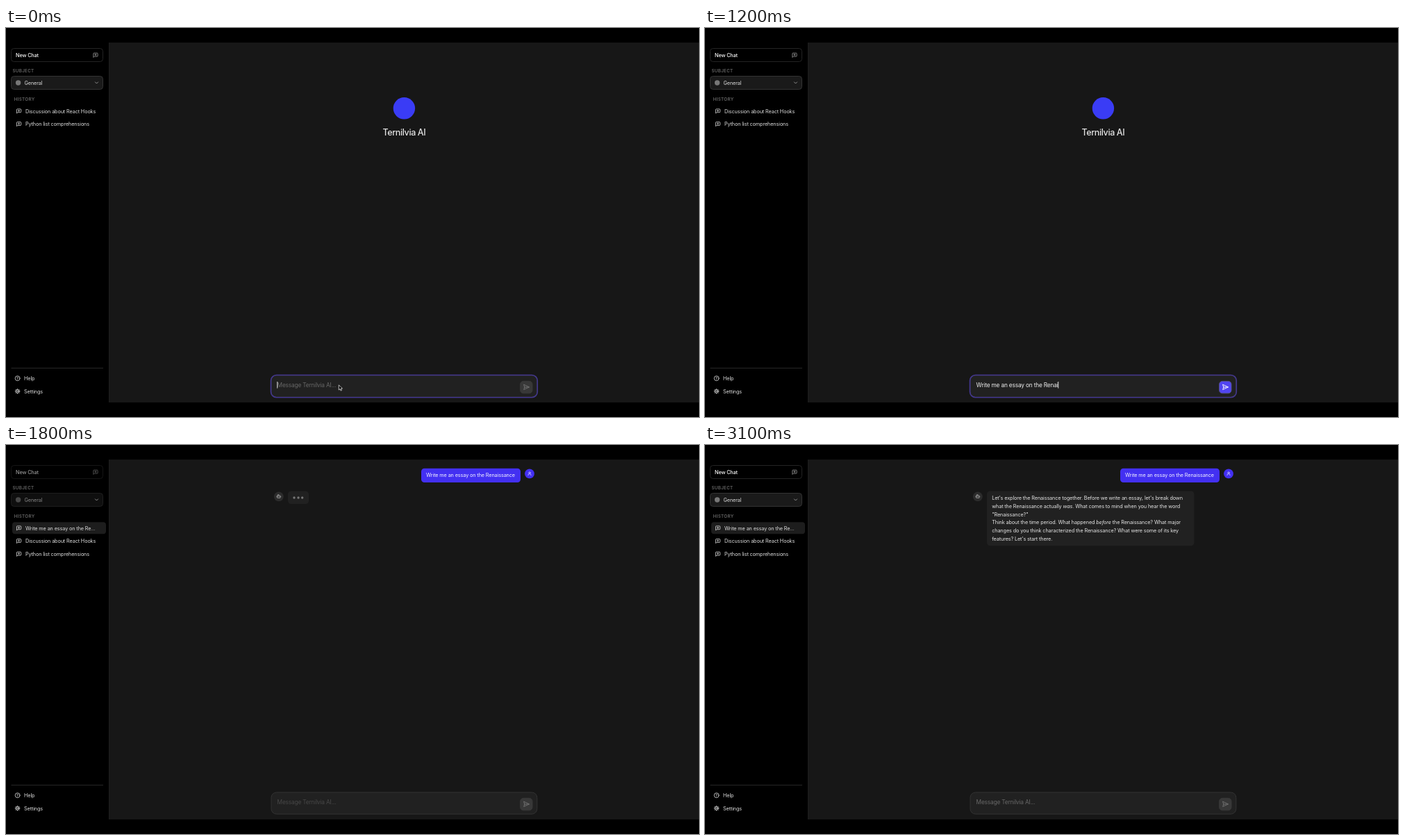
Recreate the animation shown at these times as an HTML page. Size 998 by 561 pixels, loop 3400 ms.

```html
<!DOCTYPE html>
<html lang="en">
<head>
<meta charset="utf-8">
<title>Chat demo</title>
<style>
  html, body { margin: 0; width: 100%; height: 100%; overflow: hidden; background: #000; }
  svg { display: block; width: 100vw; height: 100vh; }
  text { font: 7.28px Inter, "Liberation Sans", sans-serif; letter-spacing: -.016em; white-space: pre; fill: #dcdcdc; }
  .label { font-size: 6.24px; font-weight: 600; letter-spacing: .05em; fill: #666; }
  .field { font-size: 8.32px; letter-spacing: -.021em; }
  .title { font-size: 12.48px; font-weight: 500; letter-spacing: -.03em; fill: #e5e5e5; text-anchor: middle; }
  .icon { fill: none; stroke: #dcdcdc; stroke-width: 2.3; stroke-linecap: round; stroke-linejoin: round; }
</style>
</head>
<body>
<svg id="stage" viewBox="0 0 998 561" xmlns="http://www.w3.org/2000/svg"></svg>
<script>
const LOOP = 3400, STEP = 100;
const SENT = 1700, ANSWERED = 2300;
const PROMPT = 'Write me an essay on the Renaissance';
const BRAND = 'Ternilvia AI';
const INDIGO = '#4330f2';

const ICONS = {
  chat: '<path d="M21 15a2 2 0 0 1-2 2H7l-4 4V5a2 2 0 0 1 2-2h14a2 2 0 0 1 2 2zM12 7v6M9 10h6"/>',
  chevron: '<path d="m6 9 6 6 6-6"/>',
  help: '<circle cx="12" cy="12" r="10"/><path d="M9.1 9a3 3 0 0 1 5.8 1c0 2-2.9 3-2.9 3M12 17h.01"/>',
  gear: '<circle cx="12" cy="12" r="7.5"/><circle cx="12" cy="12" r="3"/>' +
    [0, 45, 90, 135, 180, 225, 270, 315].map(a => `<path d="M12 4.5V2.2" transform="rotate(${a} 12 12)"/>`).join(''),
  send: '<path d="m3 3 3 9-3 9 19-9ZM6 12h16"/>',
  user: '<circle cx="12" cy="8" r="4.5"/><path d="M4 21a8 8 0 0 1 16 0"/>',
  bot: '<rect x="4" y="8" width="16" height="12" rx="2"/><path d="M12 8V4H8M2 14h2M20 14h2M15 13v2M9 13v2"/>'
};

// All helpers place their content by its vertical centre.
const icon = (name, x, y, size = 8.3, attrs = '') =>
  `<g class="icon" transform="translate(${x - size / 2} ${y - size / 2}) scale(${size / 24})" ${attrs}>${ICONS[name]}</g>`;
const text = (s, x, y, attrs = '', size = 7.28) =>
  `<text x="${x}" y="${y + size * .36}" ${attrs}>${s}</text>`;
const box = (x, y, w, h, r, fill, attrs = '') =>
  `<rect x="${x}" y="${y}" width="${w}" height="${h}" rx="${r}" fill="${fill}" ${attrs}/>`;
const historyItem = (s, y) => icon('chat', 18.6, y) + text(s, 28, y);
const botAvatar = `<circle cx="392.8" cy="74.3" r="6.9" fill="#2c2c2c"/>` + icon('bot', 392.8, 74, 7, 'style="stroke:#bbb"');

const answer = [
  "Let's explore the Renaissance together. Before we write an essay, let's break down",
  'what the Renaissance actually <tspan font-style="italic">was</tspan>. What comes to mind when you hear the word',
  '"Renaissance?"',
  'Think about the time period. What happened <tspan font-style="italic">before</tspan> the Renaissance? What major',
  'changes do you think characterized the Renaissance? What were some of its key',
  "features? Let's start there."
];

document.getElementById('stage').innerHTML = `
  <rect width="998" height="561"/>
  <rect x="148" y="21" width="850" height="519" fill="#171717"/>
  <path d="M148.5 21V540" stroke="#1d1d1d"/>

  <g id="newChat">
    ${box(7.5, 29.5, 132, 19, 4, '#000', 'stroke="#242424"')}
    ${text('New Chat', 14, 39.3, 'style="font-weight:500;fill:#fff"')}
    ${icon('chat', 129, 39.3, 8.3, 'style="stroke:#a3a3a3"')}
  </g>
  ${text('SUBJECT', 9.5, 61.6, 'class="label"', 6.24)}
  <g id="subject">
    ${box(7.5, 69.5, 132, 19, 4, '#1a1a1a', 'stroke="#333"')}
    <circle cx="17.6" cy="79" r="3.7" fill="#777"/>
    ${text('General', 26.5, 79)}
  </g>
  ${icon('chevron', 130.5, 79, 8.3, 'style="stroke:#aaa"')}
  ${text('HISTORY', 11.8, 103.2, 'class="label"', 6.24)}
  <g id="newItem">
    ${box(9, 111.3, 135, 17, 4, '#1d1d1d')}
    ${historyItem('Write me an essay on the Re...', 120)}
  </g>
  <g id="oldItems">
    ${historyItem('Discussion about React Hooks', 120)}
    ${historyItem('Python list comprehensions', 138.7)}
  </g>
  <path d="M7.5 490.5H140" stroke="#262626"/>
  ${icon('help', 16.6, 505.2)}${text('Help', 26, 505.2)}
  ${icon('gear', 16.6, 523.9)}${text('Settings', 26, 523.9)}

  <g id="welcome">
    <circle cx="573.4" cy="115.8" r="15.7" fill="#3a3cf5"/>
    ${text(BRAND, 573.4, 150.5, 'class="title"', 12.48)}
  </g>

  <g id="question">
    ${box(598, 33.7, 143, 20.3, 4.5, INDIGO)}
    ${text(PROMPT, 605, 43.7, 'style="fill:#f4f4ff"')}
    <circle cx="754" cy="41.4" r="6.9" fill="${INDIGO}"/>
    ${icon('user', 754, 41.2, 6.6, 'style="stroke:#e4e2ff"')}
  </g>
  <g id="thinking">
    ${botAvatar}
    ${box(406, 66.5, 30, 18.5, 4.5, '#212121')}
    ${[415, 421, 426.7].map(x => `<circle class="dot" cx="${x}" cy="76" r="1.7" fill="#777"/>`).join('')}
  </g>
  <g id="answer">
    ${botAvatar}
    ${box(406, 66.5, 298.5, 78.8, 4.5, '#212121')}
    ${answer.map((s, i) => text(s, 413.2, 76.3 + i * 11.83, 'style="fill:#e5e5e5"')).join('')}
  </g>

  <rect id="input" x="382" y="501" width="382.8" height="31.2" rx="7.5" fill="#212121" stroke="#333"/>
  <rect id="focus" x="381.5" y="500.5" width="383.8" height="32.2" rx="8" fill="none" stroke="#43378f" stroke-width="1.6"/>
  <text id="placeholder" class="field" x="390.6" y="517.7">Message ${BRAND}...</text>
  <text id="typed" class="field" x="390.6" y="517.7" style="fill:#f0f0f0"></text>
  <rect id="caret" y="510" width=".8" height="9.6" fill="#fff"/>
  <rect id="sendBox" x="740.6" y="509.4" width="17.4" height="17.4" rx="4.4"/>
  <g id="sendIcon">${icon('send', 749.2, 518, 9.4, 'style="stroke:inherit"')}</g>
  <path id="pointer" d="M479.3 514.8v7.2l1.7-1.5 1.2 2.6 1.2-.6-1.1-2.5h2.2z" fill="#000" stroke="#fff" stroke-width=".7"/>`;

const $ = id => document.getElementById(id);
const show = (id, on) => $(id).setAttribute('display', on ? 'inline' : 'none');

function typedCount(t) {
  const keys = [[0, 0], [700, 16], [1200, 30], [1500, 36]];
  if (t >= SENT) return 0;
  for (let i = 1; i < keys.length; i++) {
    const [t0, n0] = keys[i - 1], [t1, n1] = keys[i];
    if (t <= t1) return Math.round(n0 + (n1 - n0) * (t - t0) / (t1 - t0));
  }
  return PROMPT.length;
}

// Messages fade in while rising and growing about the column centre.
function reveal(id, t, start, end, tau, cy) {
  const visible = t > start && t < end;
  show(id, visible);
  if (!visible) return;
  let p = 1 - Math.exp((start - t) / tau);
  if (p > .98) p = 1;
  const cx = 573.5;
  $(id).setAttribute('opacity', p * p);
  $(id).setAttribute('transform',
    `translate(${cx} ${cy + 9 * (1 - p)}) scale(${.9 + .1 * p}) translate(${-cx} ${-cy})`);
}

function draw(t) {
  const sent = t >= SENT, waiting = sent && t < ANSWERED;
  const count = typedCount(t);
  const active = count > 0 || t === SENT;

  $('newChat').setAttribute('opacity', waiting ? .6 : 1);
  $('subject').setAttribute('opacity', waiting ? .6 : 1);
  show('newItem', sent);
  $('oldItems').setAttribute('transform', `translate(0 ${sent ? 18.7 : 0})`);
  show('welcome', !sent);

  reveal('question', t, SENT - 10, LOOP, 25, 43.7);
  reveal('thinking', t, SENT + 5, ANSWERED, 20, 76);
  reveal('answer', t, ANSWERED - 100, LOOP, 55, 106);
  document.querySelectorAll('.dot').forEach((dot, i) => {
    const phase = (t - SENT - 100) / 1000 * 2 * Math.PI - i * .9;
    dot.setAttribute('cy', 76 - .9 * Math.max(0, Math.sin(phase)));
  });

  show('focus', t <= SENT);
  show('placeholder', !count);
  $('placeholder').style.fill = waiting ? '#484848' : '#686868';
  $('typed').textContent = PROMPT.slice(0, count);
  show('caret', !sent);
  $('caret').setAttribute('x', 390.4 + (count ? $('typed').getComputedTextLength() : 0));
  $('sendBox').setAttribute('fill', active ? '#5145f2' : '#383838');
  $('sendBox').setAttribute('stroke', active ? '#55508c' : '#383838');
  $('sendIcon').setAttribute('stroke', active ? '#fff' : '#737373');
  show('pointer', !sent && !count);
}

function tick() {
  const t = performance.now() % LOOP;
  draw(Math.floor(t / STEP) * STEP);
  requestAnimationFrame(tick);
}
tick();
</script>
</body>
</html>
```
